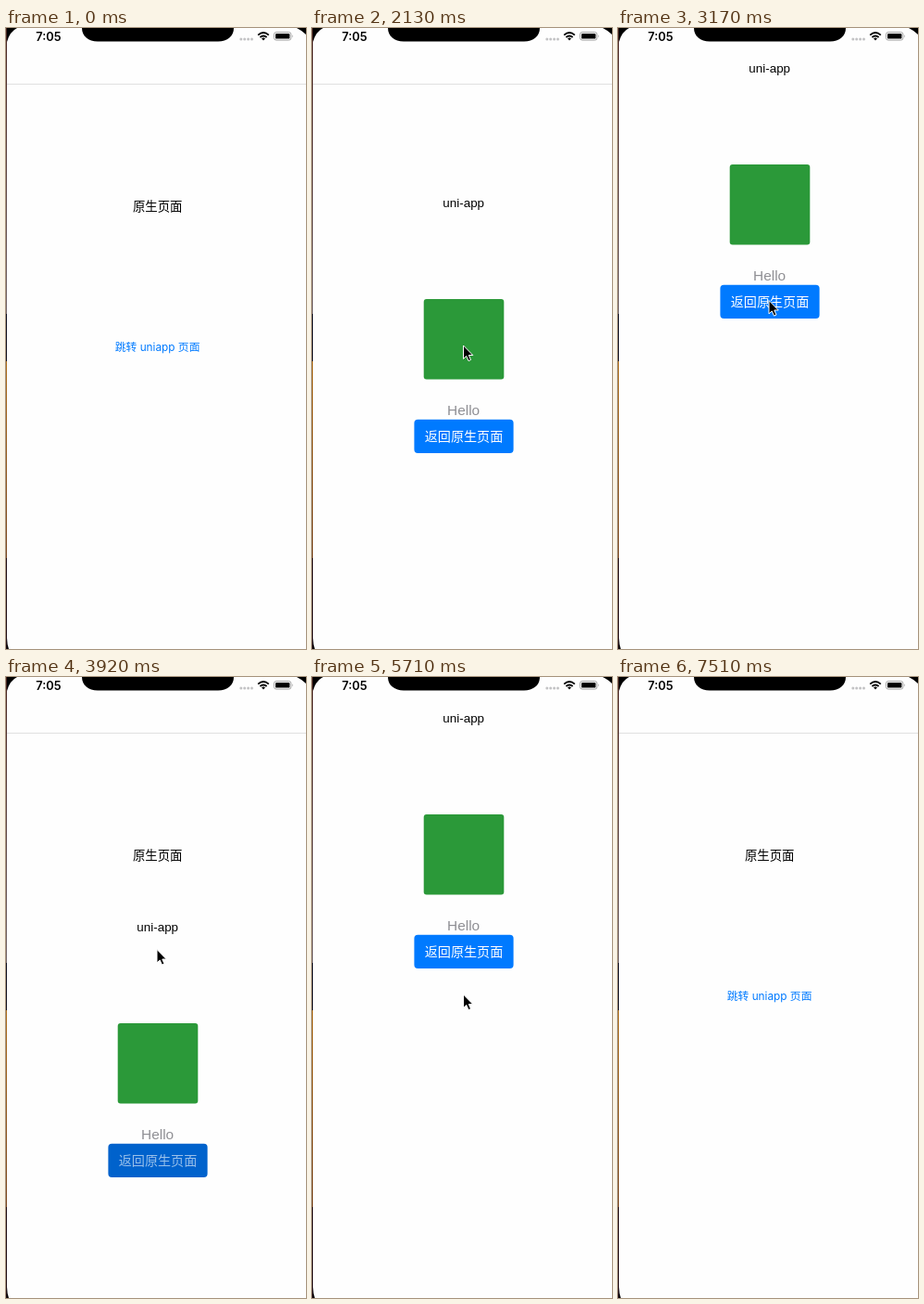
Recreate the animation shown at these times as an HTML page. Size 324 px wide and 669 px high, loop 7.54 s.

```html
<!DOCTYPE html>
<html lang="zh">
<head>
<meta charset="utf-8">
<title>uni-app</title>
<style>
  html, body { margin: 0; width: 100%; height: 100%; overflow: hidden; background: #fefefe; }
  svg { display: block; width: 100%; height: 100%; }
  text { text-anchor: middle; }
  .cjk { font-family: "Noto Sans CJK SC", "Noto Sans CJK", sans-serif; }
  .mixed { font-family: Inter, "Noto Sans CJK SC", "Noto Sans CJK", sans-serif; }
  .latin { font-family: "Liberation Sans", Arial, sans-serif; }
  #edge {
    fill: url(#wallpaper);
  }
</style>
</head>
<body>
<svg viewBox="0 0 324 669">
  <defs>
    <linearGradient id="wallpaper" x1="0" y1="0" x2="0" y2="1">
      <stop offset="0" stop-color="#4a2420"/>
      <stop offset=".46" stop-color="#75686c"/>
      <stop offset=".46" stop-color="#0e1022"/>
      <stop offset=".537" stop-color="#141220"/>
      <stop offset=".537" stop-color="#b0701c"/>
      <stop offset=".854" stop-color="#7c4820"/>
      <stop offset=".854" stop-color="#200c14"/>
    </linearGradient>
  </defs>

  <rect width="324" height="669" fill="#fefefe"/>
  <rect y="60" width="324" height="1" fill="#e0e0e0"/>
  <text class="cjk" x="163.7" y="197.2" font-size="13.4">原生页面</text>
  <text id="link" class="mixed" x="163.6" y="347.6" font-size="11.8" fill="#007aff">跳转 uniapp 页面</text>

  <g id="sheet">
    <rect width="324" height="669" fill="#fefefe"/>
    <text class="latin" x="163.7" y="47.8" font-size="13.4">uni-app</text>
    <rect x="120.7" y="147" width="86.6" height="86.4" rx="3" fill="#2b9939"/>
    <text class="latin" x="163.6" y="271.6" font-size="15.4" fill="#8f8f94">Hello</text>
    <rect id="button" x="110.4" y="276.7" width="107.2" height="36.3" rx="4"/>
    <text id="label" class="cjk" x="164" y="300.2" font-size="14.1" font-weight="300" fill="#fff">返回原生页面</text>
  </g>

  <!-- status bar and bezel -->
  <path d="M82 0C82 9 89 14.4 99 14.4H229C239 14.4 246 9 246 0Z"/>
  <path d="M1 0H12Q4 4 1 15ZM314 0H324V7Q320 3 314 0ZM1 657Q1.2 664 3 669H1Z"/>
  <text x="46" y="13.6" font-family="Inter, sans-serif" font-size="12.8" font-weight="600">7:05</text>
  <g id="dots" fill="#c3c3c5"></g>
  <g fill="none" stroke="#000" stroke-width="1.9">
    <path d="M272.2 7.6Q278 2.4 283.8 7.6M274.4 10Q278 6.8 281.6 10"/>
    <path d="M276 11.3Q278 9.8 280 11.3L278 13.4Z" fill="#000" stroke="none"/>
  </g>
  <rect x="289.5" y="4.5" width="18.4" height="8.6" rx="2.4" fill="none" stroke="#a5a5a5"/>
  <rect x="291" y="6" width="15.4" height="5.6" rx="1.2"/>
  <path d="M309 7.2Q310.6 8.8 309 10.4Z" fill="#a5a5a5"/>
  <rect id="edge" width="1" height="669"/>

  <path id="cursor" d="M0 0V14.4L3.2 11.4L5.5 16.6L8 15.5L5.8 10.5H10.3Z"
        stroke="#fff" stroke-width="1" stroke-linejoin="round"/>
</svg>
<script>
const LOOP = 7540, STEP = 150, HEIGHT = 669;
// the picture advances in steps counted from these moments
const ANCHORS = [0, 1830, 3170, 4960];

// each visit: link tapped, sheet rises, button tapped, sheet falls
const VISITS = [
  { tap: 1830, open: 1972, back: 3850, close: 3870 },
  { tap: 5110, open: 5206, back: 6460, close: 6520 }
];

// places the pointer travels between
const EDGE = [298, 357], LINK = [163.5, 342], BELOW = [158, 367], BUTTON = [163, 293.5];
const MOVES = [
  { from: 300, to: 1050, place: LINK },
  { from: 2580, to: 2880, place: BELOW },
  { from: 2880, to: 3170, place: BUTTON },
  { from: 4070, to: 4960, place: LINK },
  { from: 5710, to: 6160, place: BUTTON },
  { from: 6760, to: 7200, place: EDGE }
];

const $ = id => document.getElementById(id);
const ease = k => (1 - Math.cos(Math.PI * Math.min(1, Math.max(0, k)))) / 2;

// share of the way still left in a critically damped spring
const left = (ms, speed) => {
  const z = Math.max(0, ms) / 1000 * speed;
  return (1 + z) * Math.exp(-z);
};

function sheetY(t, visit) {
  if (!visit) return HEIGHT;
  return HEIGHT * (t < visit.close
    ? left(t - visit.open, 18.26)
    : 1 - left(t - visit.close, 24));
}

function pointerAt(t) {
  let spot = EDGE;
  for (const { from, to, place } of MOVES) {
    const k = ease((t - from) / (to - from));
    spot = spot.map((v, i) => v + (place[i] - v) * k);
  }
  return spot;
}

function stepTime(t) {
  const start = ANCHORS.filter(a => a <= t).pop();
  return start + Math.floor((t - start) / STEP) * STEP;
}

function draw(t) {
  const visit = VISITS.filter(v => v.tap <= t).pop();
  const y = Math.round(sheetY(t, visit));
  $("sheet").setAttribute("transform", `translate(0 ${y})`);

  const buttonDown = visit && t >= visit.back;
  const linkDown = visit && !buttonDown;
  $("link").style.opacity = linkDown ? 0.34 : 1;
  $("button").style.fill = buttonDown ? "#0062cc" : "#007aff";
  $("label").style.opacity = buttonDown ? 0.6 : 1;

  const shown = t >= MOVES[0].from && t < MOVES[MOVES.length - 1].to;
  $("cursor").style.display = shown ? "" : "none";
  $("cursor").setAttribute("transform", `translate(${pointerAt(t)})`);
}

$("dots").innerHTML = [0, 1, 2, 3]
  .map(i => `<circle cx="${253.8 + i * 3.9}" cy="12" r="1.5"/>`).join("");

const began = performance.now();
function tick() {
  draw(stepTime((performance.now() - began) % LOOP));
  requestAnimationFrame(tick);
}
tick();
</script>
</body>
</html>
```
